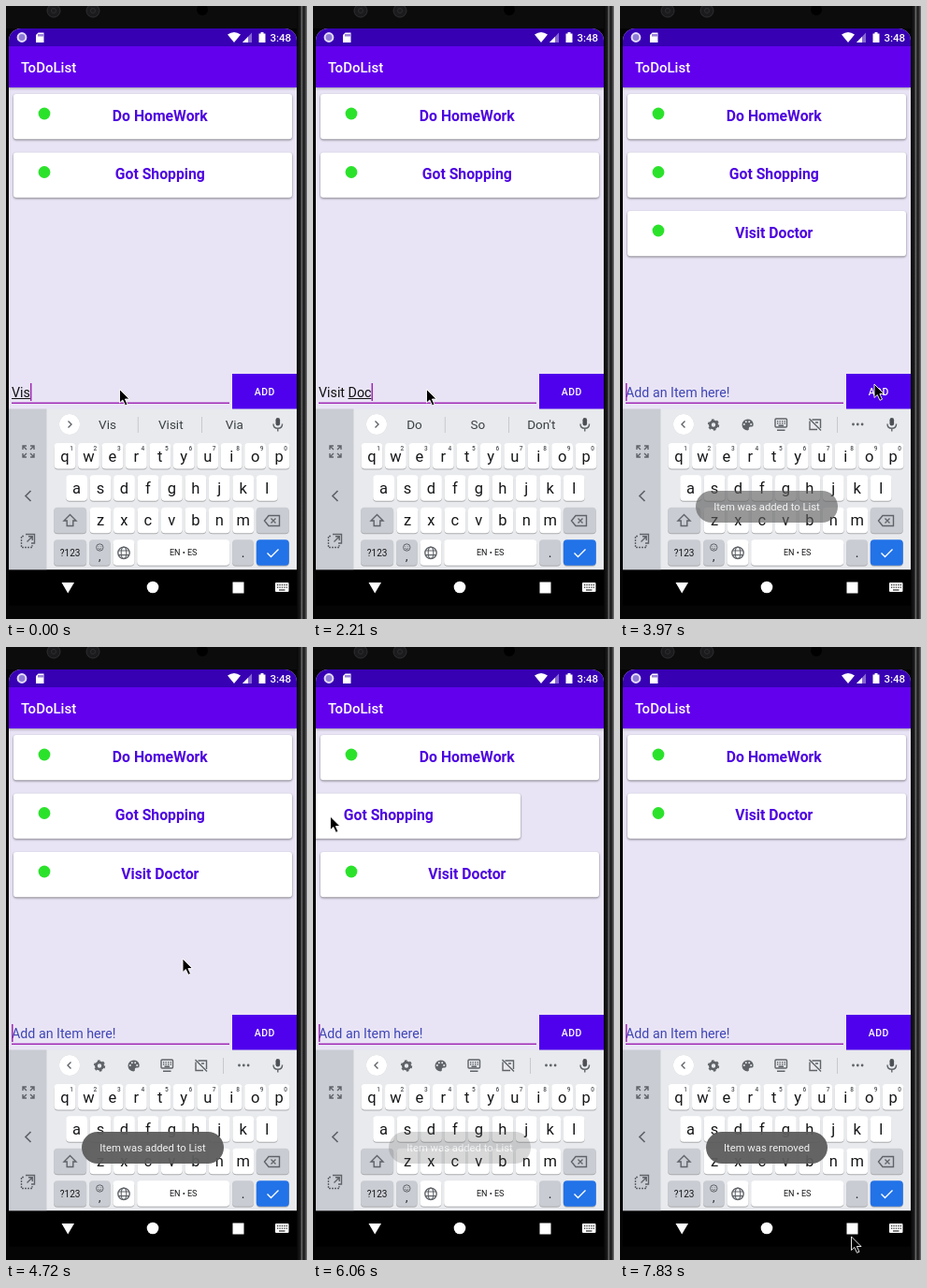
An HTML page for the animation above (8000 ms loop, 322 by 655 pixels).

```html
<!DOCTYPE html>
<html lang="en">
<head>
<meta charset="utf-8">
<title>ToDoList</title>
<style>
  html, body { margin: 0; height: 100%; overflow: hidden; background: #000; }
  svg { display: block; width: 322px; height: 655px; font-family: Roboto, sans-serif; }
  text { white-space: pre; }
  .mid { text-anchor: middle; }
  .card rect { fill: #fff; filter: drop-shadow(0 1px 1.3px #0007); }
  .card text { font: bold 15.75px Roboto, sans-serif; fill: #4d03e0; }
  .key { filter: drop-shadow(0 1px .4px #0004); }
  .line { fill: none; stroke: #5f6368; stroke-width: 1.4; }
  .field { font-size: 14.25px; }
</style>
</head>
<body>
<svg viewBox="0 0 322 655">
  <defs>
    <clipPath id="screen"><rect x="3" y="24" width="308" height="640" rx="13"/></clipPath>
    <linearGradient id="edge">
      <stop stop-color="#050505"/><stop offset=".35" stop-color="#1c1c1d"/>
      <stop offset=".5" stop-color="#666668"/><stop offset=".62" stop-color="#1c1c1d"/>
      <stop offset=".8" stop-color="#2a2a2b"/><stop offset="1" stop-color="#77777a"/>
    </linearGradient>
  </defs>

  <!-- phone body -->
  <rect width="322" height="655" fill="#050505"/>
  <rect width="312" height="24" fill="#0c0c0d"/>
  <rect x="311" width="11" height="655" fill="url(#edge)"/>
  <g fill="#1b1b1d" stroke="#2e2e31">
    <circle cx="51" cy="5" r="7"/><circle cx="93" cy="5" r="7"/>
    <circle cx="51" cy="5" r="2.5"/><circle cx="93" cy="5" r="2.5"/>
  </g>
  <circle cx="210" cy="4" r="6" fill="#000"/>

  <g clip-path="url(#screen)">
    <rect x="3" y="24" width="308" height="407" fill="#e9e4f5"/>
    <g id="cards"></g>

    <!-- app bar -->
    <rect x="3" y="43" width="308" height="44" fill="#6200ee" style="filter:drop-shadow(0 1px 1.5px #0005)"/>
    <rect x="3" y="24" width="308" height="19" fill="#3700b3"/>
    <text x="16" y="71" font-size="15" font-weight="500" fill="#fff">ToDoList</text>
    <g fill="#fff">
      <circle cx="17" cy="33.5" r="4.4" fill="#8f7bd8" stroke="#e4dcf8" stroke-width="2"/>
      <path d="M34.5 28.5H40.5V39H32V31Z"/>
      <path d="M35 30V32.5M37 30V32.5M39 30V32.5" stroke="#3700b3"/>
      <path d="M237 30.5Q244 25.5 251 30.5L244 39Z"/>
      <path d="M253 39L263 28.5V39Z" fill="#fff6"/><path d="M253 39L259 32.7V39Z"/>
      <path d="M270.5 29.5H272.5V28H275.5V29.5H277.5V39H270.5Z"/>
      <text x="282.5" y="38" font-size="11.5" font-weight="500">3:48</text>
    </g>

    <!-- input row -->
    <text id="entry" class="field" x="6" y="418"></text>
    <path id="compose" stroke="#111"/>
    <path d="M6 424.3H239" stroke="#a02bb5" stroke-width="1.5"/>
    <path id="caret" stroke="#9c27b0" stroke-width="1.5"/>
    <rect x="242" y="393" width="69" height="38" fill="#4f00ec"/>
    <text class="mid" x="276.8" y="416" font-size="10.5" font-weight="500" letter-spacing=".5" fill="#fff">ADD</text>

    <!-- keyboard -->
    <rect x="3" y="430.5" width="308" height="172" fill="#e8eaed"/>
    <rect x="3" y="430.5" width="40.5" height="172" fill="#c9ccd3"/>
    <g class="line">
      <path d="M22 474L18.5 470.5M18 474V470H22M26 474L29.5 470.5M26 470H30V474M22 478L18.5 481.5M18 478V482H22M26 478L29.5 481.5M26 482H30V478"/>
      <path d="M26.5 518L21 523.5L26.5 529" stroke-width="1.7"/>
      <path d="M21 564.5H30.5V574H27M22.5 572.5L28 567M24 566.8H28.2V571"/>
      <path d="M19 566.5H16.5V578.5H28V576" stroke-dasharray="2 1"/>
    </g>
    <circle cx="68" cy="447" r="11" fill="#fff" style="filter:drop-shadow(0 .5px .5px #0003)"/>
    <path id="chevron" class="line"/>
    <rect x="288.5" y="440" width="4.6" height="8.5" rx="2.3" fill="#4d5156"/>
    <path class="line" d="M286 446.5Q286 451.3 290.8 451.3T295.6 446.5M290.8 451V454.5"/>
    <g id="hints" font-size="13.5" fill="#3c4043" class="mid">
      <path d="M141.3 439V456M209.5 439V456" stroke="#c6c9cd"/>
      <text x="108.5" y="452"></text><text x="176.3" y="452"></text><text x="244.3" y="452"></text>
    </g>
    <g id="tools" fill="#5f6368">
      <circle class="line" cx="100" cy="447.5" r="3.6" style="stroke-width:2.8"/>
      <circle class="line" cx="100" cy="447.5" r="5.3" stroke-dasharray="2.6 2.95" style="stroke-width:1.8"/>
      <path d="M136.5 441.5A6 6 0 0 0 136.5 453.5Q138.5 453 137.8 451Q137.8 449.5 139.5 449.5H141Q143 449 142.7 446.5Q141.7 441.5 136.5 441.5Z"/>
      <g fill="#e8eaed"><circle cx="132.8" cy="447" r="1"/><circle cx="134.8" cy="444.3" r="1"/><circle cx="138.2" cy="444.3" r="1"/><circle cx="140.2" cy="447" r="1"/></g>
      <rect class="line" x="166" y="441" width="12.5" height="9" rx="1"/>
      <path class="line" d="M168 443.8H177M168 446H177" stroke-dasharray="1.3 1.2"/>
      <path class="line" d="M169.5 448.3H175M168 453.3H176.5"/>
      <path class="line" d="M205.5 442H214.5V451M211 452.5H203V443.5M202.5 441L215 453.5M209 445H212"/>
      <path d="M232.5 439V456" stroke="#c6c9cd"/>
      <circle cx="249.5" cy="447" r="1.4"/><circle cx="254.3" cy="447" r="1.4"/><circle cx="259.1" cy="447" r="1.4"/>
    </g>
    <g id="keys" fill="#161719"></g>
    <g class="line">
      <path d="M68.5 543.5L75 550H71.8V555.5H65.2V550H62Z"/>
      <path d="M281 544.5H292.5V555.5H281L276.5 550ZM283.5 547.5L288.5 552.5M288.5 547.5L283.5 552.5"/>
      <circle cx="100.3" cy="578.5" r="3.7" style="stroke-width:1"/>
      <path d="M98.5 579.5Q100.3 581.5 102.1 579.5M99 577.3V577.9M101.6 577.3V577.9" style="stroke-width:1"/>
      <circle cx="126" cy="584.3" r="6.2"/>
      <ellipse cx="126" cy="584.3" rx="2.8" ry="6.2" style="stroke-width:1.1"/>
      <path d="M120.5 582H131.5M120.5 586.6H131.5" style="stroke-width:1.1"/>
      <path d="M279.5 584.5L283.5 588.5L291.5 580.5" style="stroke:#fff"/>
    </g>

    <!-- navigation bar -->
    <rect x="3" y="602.5" width="308" height="38" fill="#000"/>
    <g fill="#fff">
      <path d="M59.5 616H73L66.2 627.5Z"/>
      <circle cx="157" cy="621" r="6.3"/>
      <rect x="242.5" y="615.5" width="12" height="12"/>
      <rect x="288" y="616" width="14.5" height="10" rx="1"/>
      <path d="M290 618.7H301M290 621.2H301" stroke="#000" stroke-dasharray="1.3 1.1"/>
      <path d="M292 624H298.5" stroke="#000"/>
    </g>

    <g id="toast">
      <rect y="518" height="34" rx="17" fill="#5c5c5c" fill-opacity=".95"/>
      <text class="mid" x="157" y="539" font-size="11.25" fill="#f2f2f2"></text>
    </g>
  </g>
  <path id="pointer" d="M0 0V14.5L3.3 11.5L6 17.3L8.5 16.2L5.9 10.5H10.5Z" stroke="#fff" stroke-width=".9"/>
</svg>

<script>
const LOOP = 8000, STEP = 147.2, STEP_MS = 147.5, LAST = 53, ROW = 62.5;
const $ = id => document.getElementById(id);
const set = (el, attrs) => { for (const n in attrs) el.setAttribute(n, attrs[n]); };
const show = (el, on) => el.style.display = on ? '' : 'none';
const pen = document.createElement('canvas').getContext('2d');
pen.font = '14.25px Roboto, sans-serif';
const width = s => pen.measureText(s).width;

$('cards').innerHTML = ['Do HomeWork', 'Got Shopping', 'Visit Doctor'].map((name, i) =>
  `<g class="card" transform="translate(0 ${i * ROW})">
    <rect x="8" y="94" width="298" height="48.3" rx="3"/>
    <circle cx="41" cy="115" r="6.4" fill="#2be22b"/>
    <text class="mid" x="164.8" y="122.8">${name}</text></g>`).join('');
const cards = $('cards').children;

// Keyboard
const key = (x, y, w, label = '', fill = '#fff', size = 16.5) =>
  `<rect class="key" x="${x - w / 2}" y="${y}" width="${w}" height="27.5" rx="4" fill="${fill}"/>
   <text class="mid" x="${x}" y="${y + 14 + size * .34}" font-size="${size}">${label}</text>`;
const row = (letters, x, y) => [...letters].map((c, i) => key(x + i * 25.45, y, 22.8, c)).join('');
const gray = '#c9ccd2';
$('keys').innerHTML =
  row('qwertyuiop', 63, 467) + row('asdfghjkl', 75.6, 501.3) + row('zxcvbnm', 101, 535.8) +
  [...'1234567890'].map((d, i) =>
    `<text class="mid" x="${70 + i * 25.45}" y="475" font-size="6.5" font-weight="500" fill="#4d5156">${d}</text>`).join('') +
  key(68.6, 535.8, 35, '', gray) + key(285.3, 535.8, 35, '', gray) +
  key(68.6, 570.3, 35, '?123', gray, 10) + key(100.3, 570.3, 22.5, '', gray) +
  key(126, 570.3, 22.8) + key(189.7, 570.3, 99, 'EN • ES', '#fff', 9) +
  key(253.5, 570.3, 22.8, '.', gray, 14) + key(285.3, 570.3, 35, '', '#2272e8') +
  '<text class="mid" x="100.3" y="592" font-size="12">,</text>';

const typed = [ // step, text, start of the underlined word
  [-1, 'Vis', 0], [1, 'Visi', 0], [5, 'Visit', 0], [6, 'Visit ', 0], [8, 'Visit ', 6],
  [10, 'Visit D', 6], [13, 'Visit Do', 6], [15, 'Visit Doc', 6], [17, 'Visit Doct', 6],
  [18, 'Visit Docto', 6], [20, 'Visit Doctor', 6], [24.55, '', 0]
];
const hints = [
  [0, 'Vis', 'Visit', 'Via'], [2, 'Visi', 'Visit', 'Vision'], [6, 'Visit', 'Visits', 'Visited'],
  [8, 'the', 'my', 'your'], [11, 'D', 'Do', 'Did'], [14, 'Do', 'So', 'Don\'t'],
  [16, 'Doc', 'Doctor', 'Doctor\'s'], [18, 'Doctor', 'Doctors', 'Doctor\'s']
];
const pointer = [[20, 121.5, 409.5], [24, 272, 404], [29, 272, 404], [32, 189, 333],
  [37, 110, 178], [38, 93, 179], [41, 18.5, 181], [46, 18.5, 181], [53, 247.5, 630]];
const swipe = [[37, 0], [38, -12], [41, -84], [43, -310]];
const rise = [[44, 0], [45, -40], [46, -ROW]];
const fade = [[25, 0], [28, 1], [39, 1], [41, .25], [42, 0], [43, 0], [45, .68], [46, 1]];

const current = (list, k) => list.findLast(e => e[0] <= k);
function at(keys, k, i = 1) {
  const n = keys.findIndex(e => e[0] > k);
  if (n < 0) return keys.at(-1)[i];
  if (!n) return keys[0][i];
  const a = keys[n - 1], b = keys[n];
  return a[i] + (b[i] - a[i]) * (k - a[0]) / (b[0] - a[0]);
}

function draw(k) {
  const [since, text, from] = current(typed, k);
  const entry = $('entry');
  entry.textContent = text || 'Add an Item here!';
  set(entry, { fill: text ? '#111' : '#3f45b5' });
  const start = 6 + width(text.slice(0, from)), end = 6 + width(text.trimEnd());
  set($('compose'), { d: end > start ? `M${start} 419.5H${end}` : '' });
  set($('caret'), { d: `M${6.8 + width(text)} 403V422` });
  show($('caret'), (k - since) * STEP_MS % 1000 < 500);

  const tools = k >= 26;
  show($('tools'), tools);
  show($('hints'), !tools);
  set($('chevron'), { d: tools ? 'M69.5 443.5L66 447L69.5 450.5' : 'M66.5 443.5L70 447L66.5 450.5' });
  const words = current(hints, k);
  $('hints').querySelectorAll('text').forEach((el, i) => el.textContent = words[i + 1]);

  set(cards[1], { transform: `translate(${at(swipe, k)} ${ROW})` });
  set(cards[2], { transform: `translate(0 ${2 * ROW + at(rise, k)})` });
  show(cards[1], k < 43);
  show(cards[2], k >= 25);

  const [box, label] = $('toast').children, removed = k >= 43, w = removed ? 130 : 152;
  set(box, { x: 157 - w / 2, width: w });
  label.textContent = removed ? 'Item was removed' : 'Item was added to List';
  set($('toast'), { opacity: at(fade, k) });
  set($('pointer'), { transform: `translate(${at(pointer, k)} ${at(pointer, k, 2)})` });
}

function tick() {
  const t = performance.now() % LOOP;
  draw(Math.min(LAST, Math.floor((t + 8) / STEP)));
  requestAnimationFrame(tick);
}
tick();
</script>
</body>
</html>
```
